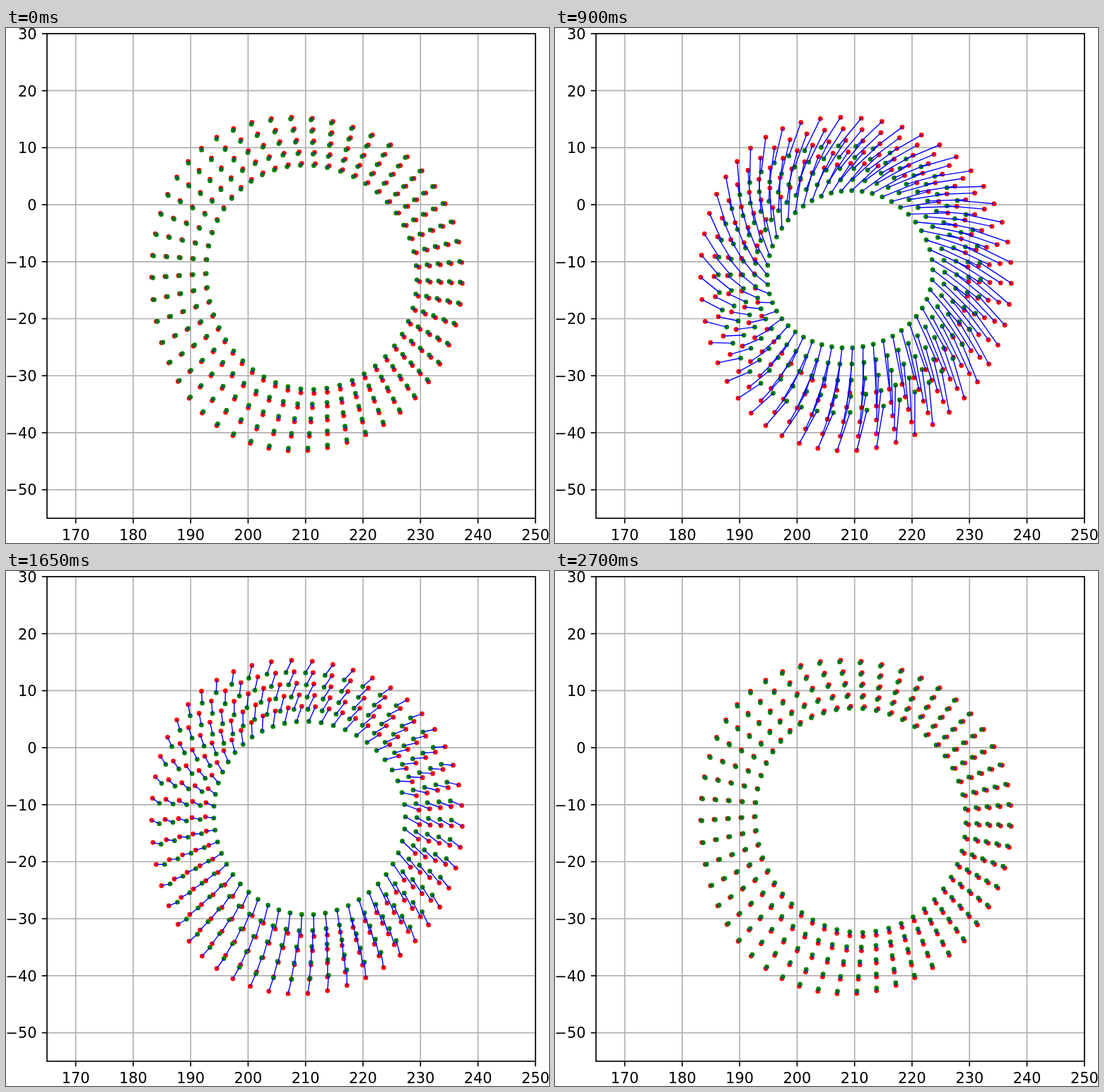
These frames come from a looping animation (768x729 px, 2850 ms). An HTML page with a canvas:

```html
<!DOCTYPE html>
<html lang="en">
<head>
<meta charset="utf-8">
<title>Ring displacement</title>
<style>
html, body { margin: 0; width: 100%; height: 100%; overflow: hidden; background: #fff; }
canvas { display: block; }
</style>
</head>
<body>
<canvas id="plot" width="768" height="729"></canvas>
<script>
const ctx = document.getElementById('plot').getContext('2d');
const RINGS = 5, SPOKES = 50;
const STEP = 150, LOOP = 2850;
const BOX = { left: 58, right: 748.8, top: 8, bottom: 694 };

// A shape is a sum of rotating vectors: turns per lap, the vector on the
// outer ring and the vector on the inner ring. Rings between are blended.
const term = (turns, outer, inner) => ({ turns, outer, inner });

const rest = [
  term(0, [420.7, 359.9], [430.3, 353.9]),
  term(1, [-10.8, -229.4], [-6.7, -157]),
  term(-1, [-0.2, -8.2], [-2, -5.8]),
  term(2, [-0.8, 0.1], [-2, -0.2]),
  term(-2, [-4.5, 2.2], [-1.3, 0.7]),
  term(-3, [-0.4, 1.8], [0, 0])
];

// Displacements: shift, shrink with twist, oval squeeze.
const peak = [
  term(0, [-7.8, -5.6], [-15.3, -10.1]),
  term(1, [-21.6, 43.3], [-16.8, 45.2]),
  term(-1, [0.7, 6.5], [3, 9]),
  term(-2, [1.3, -1.6], [1.4, -2])
];
const relaxing = [
  term(0, [-3.1, -2.3], [-5.4, -5.3]),
  term(1, [-7, 20], [-5, 25.9]),
  term(-1, [-0.5, 2.1], [0.6, 4.3])
];
const late = [
  term(0, [-1.7, -1.6], [-3.4, -4]),
  term(1, [-2.6, 7.2], [-2.2, 9.2]),
  term(-1, [0.2, 0.8], [0, 2.2])
];

function mix(a, b, t) {
  return [a[0] + (b[0] - a[0]) * t, a[1] + (b[1] - a[1]) * t];
}

function field(terms) {
  const points = [];
  for (let k = 0; k < SPOKES; k++) {
    for (let r = 0; r < RINGS; r++) {
      let x = 0, y = 0;
      for (const { turns, outer, inner } of terms) {
        const a = 2 * Math.PI * turns * k / SPOKES;
        const [u, v] = mix(outer, inner, r / (RINGS - 1));
        x += u * Math.cos(a) - v * Math.sin(a);
        y += u * Math.sin(a) + v * Math.cos(a);
      }
      points.push([x, y]);
    }
  }
  return points;
}

function scaled(points, outer, inner = outer) {
  return points.map((p, i) => {
    const [sx, sy] = mix(outer, inner, (i % RINGS) / (RINGS - 1));
    return [p[0] * sx, p[1] * sy];
  });
}

const linear = p => p;
const easeIn = p => p ** 1.5;
const easeOut = p => 1 - (1 - p) ** 1.6;

const dots = field(rest);
const start = scaled(field(late), [0.36, 0.36]);
// Each key: time, pose, easing towards the next key.
const keys = [
  [0, start, easeIn],
  [600, scaled(field(peak), [0.74, 0.74], [0.8, 0.8]), easeOut],
  [900, field(peak), easeIn],
  [1350, field(relaxing), linear],
  [1650, scaled(field(relaxing), [0.75, 0.87]), linear],
  [2100, field(late), easeOut],
  [2700, start, linear]
];

function shiftAt(time) {
  const i = keys.findLastIndex(key => key[0] <= time);
  const [from, a, ease] = keys[i];
  if (i === keys.length - 1) return a;
  const [to, b] = keys[i + 1];
  const t = ease((time - from) / (to - from));
  return a.map((p, n) => mix(p, b[n], t));
}

const toX = v => BOX.left + (v - 165) * (BOX.right - BOX.left) / 85;
const toY = v => BOX.top + (30 - v) * (BOX.bottom - BOX.top) / 85;

function line(x1, y1, x2, y2) {
  ctx.beginPath();
  ctx.moveTo(x1, y1);
  ctx.lineTo(x2, y2);
  ctx.stroke();
}

function drawAxes() {
  const { left, right, top, bottom } = BOX;
  ctx.font = '20.83px "DejaVu Sans", sans-serif';
  ctx.textBaseline = 'alphabetic';
  ctx.fillStyle = '#000';
  ctx.lineWidth = 1.67;
  const tick = (x, y, dx, dy, gx, gy) => {
    ctx.strokeStyle = '#b0b0b0';
    line(x, y, gx, gy);
    ctx.strokeStyle = '#000';
    line(x, y, x + dx, y + dy);
  };
  ctx.textAlign = 'center';
  for (let v = 170; v <= 250; v += 10) {
    const x = toX(v);
    tick(x, bottom, 0, 7.3, x, top);
    ctx.fillText(v, x, 724.5);
  }
  ctx.textAlign = 'right';
  for (let v = -50; v <= 30; v += 10) {
    const y = toY(v);
    tick(left, y, -7.3, 0, right, y);
    ctx.fillText(String(v).replace('-', '\u2212'), 43.5, y + 7.8);
  }
}

function drawDots(points, color) {
  ctx.fillStyle = color;
  ctx.beginPath();
  for (const [x, y] of points) {
    ctx.moveTo(x + 3.4, y);
    ctx.arc(x, y, 3.4, 0, 2 * Math.PI);
  }
  ctx.fill();
}

function draw(time) {
  ctx.fillStyle = '#fff';
  ctx.fillRect(0, 0, 768, 729);
  drawAxes();
  const shift = shiftAt(time);
  const moved = dots.map((p, i) => [p[0] + shift[i][0], p[1] + shift[i][1]]);
  drawDots(dots, '#f00');
  drawDots(moved, '#008000');
  ctx.strokeStyle = '#00f';
  ctx.lineWidth = 1.4;
  dots.forEach((p, i) => line(...p, ...moved[i]));
  ctx.strokeStyle = '#000';
  ctx.lineWidth = 1.67;
  ctx.strokeRect(BOX.left, BOX.top, BOX.right - BOX.left, BOX.bottom - BOX.top);
}

const begin = performance.now();
let shown = -1;
function loop() {
  const step = Math.floor(((performance.now() - begin) % LOOP) / STEP);
  if (step !== shown) {
    shown = step;
    draw(step * STEP);
  }
  requestAnimationFrame(loop);
}
loop();
</script>
</body>
</html>
```
